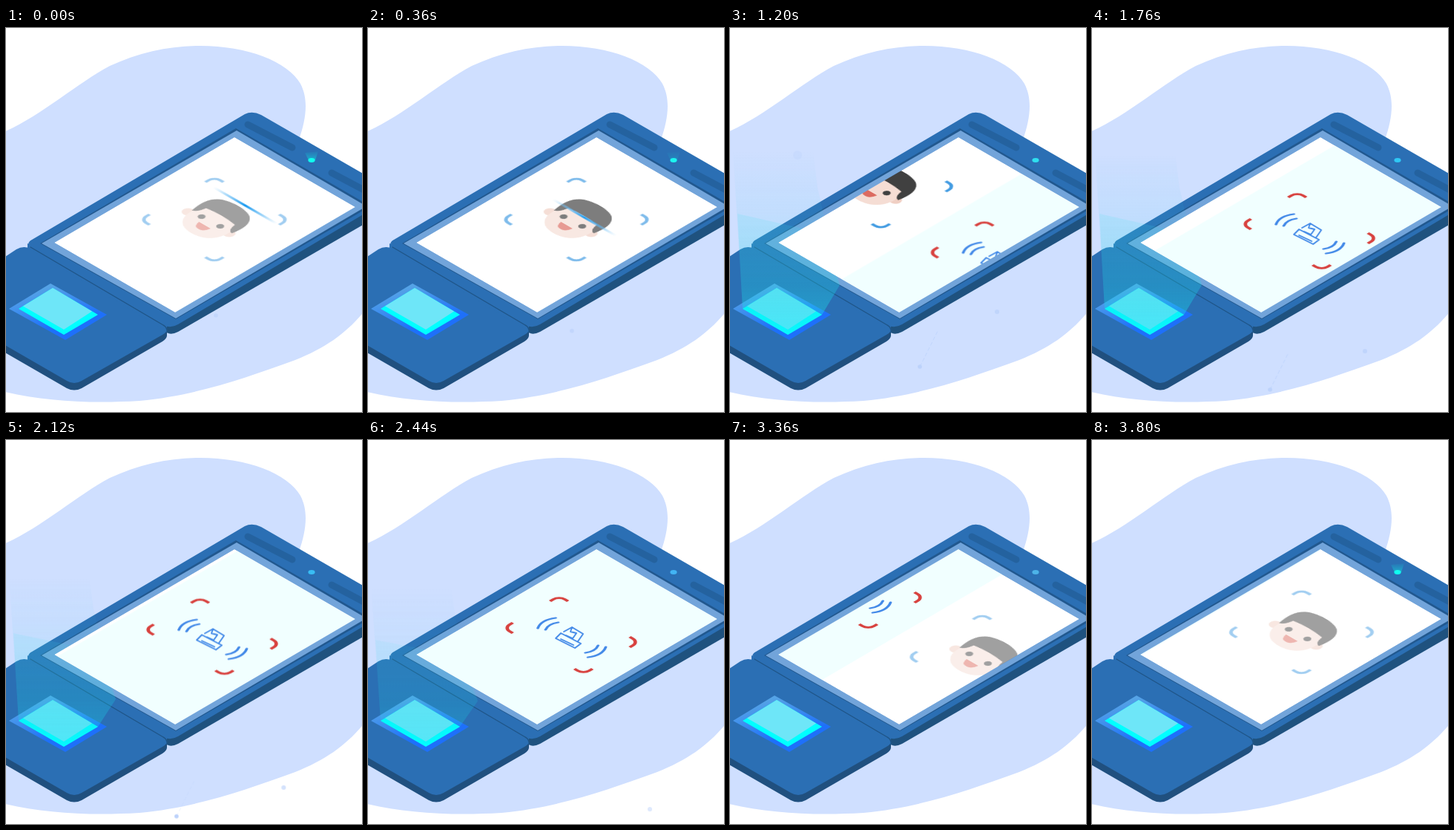
Recreate the animation shown at these times as an HTML page. Size 480 by 517 pixels, loop 3840 ms.

```html
<!DOCTYPE html>
<html lang="en">
<head>
<meta charset="utf-8">
<title>Face and card scan</title>
<style>
html, body { margin: 0; width: 100%; height: 100%; overflow: hidden; background: #fff; }
svg { display: block; width: 480px; height: 517px; }
.line { fill: none; stroke-linecap: round; stroke-linejoin: round; }
#beam { transform-origin: 70px 385px; }
</style>
</head>
<body>
<svg viewBox="0 0 480 517" xmlns="http://www.w3.org/2000/svg">
  <defs>
    <clipPath id="glass"><path d="M308 147 471 241 228 383 65 289Z"/></clipPath>
    <linearGradient id="haze" gradientUnits="userSpaceOnUse" x1="0" y1="165" x2="0" y2="400">
      <stop offset="0" stop-color="#3fd3f0" stop-opacity="0"/>
      <stop offset=".4" stop-color="#3fd3f0" stop-opacity=".1"/>
      <stop offset="1" stop-color="#20dcea" stop-opacity=".2"/>
    </linearGradient>
    <linearGradient id="glow" gradientUnits="userSpaceOnUse" x1="0" y1="250" x2="0" y2="410">
      <stop offset="0" stop-color="#3fe0f0" stop-opacity=".14"/>
      <stop offset=".6" stop-color="#18d0e0" stop-opacity=".18"/>
      <stop offset="1" stop-color="#10f0ff" stop-opacity=".28"/>
    </linearGradient>
    <linearGradient id="rim" x1="0" y1="0" x2=".5" y2="1">
      <stop offset=".2" stop-color="#55a3e6"/>
      <stop offset=".8" stop-color="#1e70fa"/>
    </linearGradient>
    <linearGradient id="ray">
      <stop offset="0" stop-color="#8fd0fa" stop-opacity="0"/>
      <stop offset=".2" stop-color="#6fc0f6" stop-opacity=".6"/>
      <stop offset=".5" stop-color="#1296ee"/>
      <stop offset=".8" stop-color="#6fc0f6" stop-opacity=".6"/>
      <stop offset="1" stop-color="#8fd0fa" stop-opacity="0"/>
    </linearGradient>
    <linearGradient id="lamp" x1="0" y1="0" x2="0" y2="1">
      <stop offset="0" stop-color="#12dce0" stop-opacity=".05"/>
      <stop offset="1" stop-color="#12dce0" stop-opacity=".55"/>
    </linearGradient>
  </defs>

  <path fill="#cfdfff" d="M-5 141C45 120 95 75 140 51C180 33 220 24 262 24C325 24 380 45 397 75C408 96 405 122 395 150L480 250V385C457 412 430 431 390 447C320 472 260 494 180 502C110 506 50 502-5 489Z"/>

  <g fill="#bcd2fb">
    <line id="thread" x1="0" y1="0" x2="24" y2="-48" stroke="#bcd2fb" stroke-width="1" stroke-dasharray="5 3"/>
    <circle id="dotA" r="2.8"/>
    <circle id="dotB" r="3"/>
    <circle id="dotC" r="6"/>
  </g>

  <!-- reader panel -->
  <path fill="#20507f" d="M-10 415V432L82 485Q92 490 102 485L211 422Q217 418 217 414V404L92 470Z"/>
  <path fill="#2b6fb4" d="M-10 314 14 298Q24 292 36 298L211 400Q222 407 211 413L102 475Q92 481 82 475L-10 422Z"/>
  <path fill="url(#rim)" d="M4 378 60 344 136 386 80 420Z"/>
  <path fill="#00ffff" d="M17 378 63 350 124 386 78 413Z"/>
  <path fill="#6ee6f8" d="M23 374.5 63 350 116 381.5 78 406Z"/>

  <!-- phone -->
  <path fill="#1f527f" d="M212 398 217 410Q222 414 232 409L490 260V240L222 390Z"/>
  <path fill="#2b6fb4" d="M29 290V296L210 405Q217 410 217 410V398Z"/>
  <path fill="#2b6fb4" d="M322 116Q332 111 344 117L490 201V246L232 399Q222 405 212 400L34 296Q26 290 35 285Z"/>
  <path class="line" stroke="#1f5588" stroke-width="1.4" d="M33 295 212 400Q218 403 217 410"/>
  <path fill="#21588f" d="M310 135 490 239 490 241 229 392 46 290Z"/>
  <path fill="#72a4da" d="M311 138 486 240 229 391 48 290Z"/>
  <path class="line" stroke="#24629f" stroke-width="9" d="M326 130 386 161M439 195 490 222"/>
  <path id="cone" fill="url(#lamp)" d="M403 168 421 166 417 178 408 178Z"/>
  <ellipse id="lens" cx="412" cy="178" rx="4.6" ry="3" fill="#10fff0"/>

  <g id="beam">
    <path fill="url(#haze)" d="M17 378 4 165 112 165 118 215 148 346 124 386 78 413Z"/>
    <path fill="url(#glow)" d="M17 378 10 250 120 275 148 346 124 386 78 413Z"/>
  </g>

  <g clip-path="url(#glass)">
    <path fill="#fff" d="M308 147 471 241 228 383 65 289Z"/>
    <g id="facePage">
      <g transform="matrix(.866 .5 -.866 .5 281 258)">
        <g id="face">
          <path class="line corners" data-w="57.5" data-h="57.5" stroke="#439ce2"/>
          <g fill="#f0cfc3">
            <circle cx="-31" cy="10" r="7"/>
            <circle cx="30" cy="7" r="7"/>
          </g>
          <path fill="#f5ddd4" d="M-29-15H29V8C29 26 17 36 0 36S-29 26-29 8Z"/>
          <path fill="#404040" d="M-30 5C-33-10-33-23-25-30C-14-39 12-39 24-31C34-23 35-10 32 5C27 4 24 0 23-9Q0-13-22-9C-23 0-26 4-30 5Z"/>
          <circle cx="-14" cy="6" r="4.4" fill="#404040"/>
          <circle cx="13.5" cy="4.5" r="4.4" fill="#404040"/>
          <path fill="#dc6b60" d="M-9 15H9Q8 25 0 25T-9 15Z"/>
        </g>
        <rect id="scan" x="-47" y="-1.7" width="98" height="3.4" fill="url(#ray)"/>
      </g>
    </g>
    <g id="cardPage">
      <path fill="#f1ffff" d="M308 147 471 241 228 383 65 289Z"/>
      <path class="line corners" data-w="62" data-h="43" stroke="#d8423f" transform="matrix(.866 .5 -.866 .5 274 262.5)"/>
      <g class="line" stroke="#4289e8" transform="translate(273 265)">
        <path stroke-width="1.9" d="M-20 2-13-5 14 9 6 15ZM-9-7 2-13 17-4 10 6M-6-2 3 2 8-5 0-7 2-13M-13 3 4 11"/>
        <path stroke-width="3" transform="matrix(.866 .5 -.866 .5 0 0)" d="M-37-14Q-46 0-37 14M-29-10Q-35 0-29 10M41-14Q50 0 41 14M33-10Q39 0 33 10"/>
      </g>
    </g>
  </g>
</svg>
<script>
const LOOP = 3840;
const now = document.timeline.currentTime;

// Four rounded corners, with short straight tails, of a frame of half-size w x h
for (const el of document.querySelectorAll('.corners')) {
  const { w, h } = el.dataset, r = 9, tail = 5;
  let d = '';
  for (const sx of [-1, 1]) for (const sy of [-1, 1]) {
    const sweep = sx * sy > 0 ? 0 : 1;
    d += `M${sx * w} ${sy * (h - r - tail)}v${sy * tail}`
       + `A${r} ${r} 0 0 ${1 - sweep} ${sx * (w - r)} ${sy * h}h${-sx * tail}`;
  }
  el.setAttribute('d', d);
  el.setAttribute('stroke-width', 3.8);
  el.style.strokeLinecap = 'butt';
}

// rows: [ms, value, easing to the next row]
function play(id, prop, rows) {
  const frames = rows.map(([ms, value, easing = 'linear']) =>
    ({ offset: ms / LOOP, [prop]: value, easing }));
  const anim = document.getElementById(id).animate(frames, { duration: LOOP, iterations: Infinity });
  anim.startTime = now;
}
const at = (x, y) => `translate(${x}px, ${y}px)`;

const right = at(163, 94), home = at(0, 0), left = at(-163, -94);
const slideIn = 'ease', slideOn = 'cubic-bezier(.33,.15,.6,.92)';

play('facePage', 'transform', [[0, home], [700, home, slideIn], [2480, left], [2760, left], [2760, right, slideOn], [LOOP, home]]);
play('cardPage', 'transform', [[0, right], [700, right, slideIn], [2480, home], [2760, home, slideOn], [LOOP, left]]);

play('face', 'opacity', [[0, .5], [970, 1], [2760, 1], [2760, .5], [LOOP, .5]]);
play('scan', 'transform', [[0, at(3, -43)], [1000, at(-1, 51)], [LOOP, at(-1, 51)]]);
play('scan', 'opacity', [[0, 1], [720, .85], [860, .7], [1000, 0], [LOOP, 0]]);

play('beam', 'opacity', [[0, 0], [570, 0], [720, .85], [1200, 1], [1760, 1], [2440, .6], [2920, .25], [3360, 0], [LOOP, 0]]);
play('beam', 'transform', [[0, 'scaleY(1)'], [1760, 'scaleY(1)'], [2440, 'scaleY(.86)'], [2920, 'scaleY(.65)'], [LOOP, 'scaleY(.4)']]);

play('lens', 'fill', [[0, '#10fff0'], [720, '#28ecf0'], [1200, '#2fe0f0'], [1760, '#2fc8f5'], [2440, '#42b4f4'], [2920, '#5aa5e5'], [3400, '#4cb4e8'], [3760, '#10fff0'], [LOOP, '#10fff0']]);
play('cone', 'opacity', [[0, 1], [560, 0], [3400, 0], [3760, 1], [LOOP, 1]]);

const fall = [[0, at(283, 387)], [1200, at(256, 456)], [2400, at(222, 522)], [LOOP, at(222, 530)]];
play('dotA', 'transform', fall);
play('dotA', 'opacity', [[0, .6], [1200, 1], [2400, 1], [2400, 0], [LOOP, 0]]);
play('thread', 'transform', fall);
play('thread', 'opacity', [[0, 0], [800, 0], [1200, .8], [1760, .8], [2300, 0], [LOOP, 0]]);
play('dotB', 'transform', [[0, at(343, 270)], [1200, at(360, 382)], [1760, at(368, 435)], [2440, at(380, 497)], [2760, at(386, 527)], [LOOP, at(386, 527)]]);
play('dotB', 'opacity', [[0, 0], [900, 0], [1200, .8], [1760, .8], [2440, .5], [2760, .5], [2760, 0], [LOOP, 0]]);
play('dotC', 'transform', [[0, at(46, 68)], [1200, at(91, 171)], [1760, at(112, 219)], [LOOP, at(190, 397)]]);
play('dotC', 'opacity', [[0, 0], [800, 0], [1200, .3], [1760, 0], [LOOP, 0]]);
</script>
</body>
</html>
```
